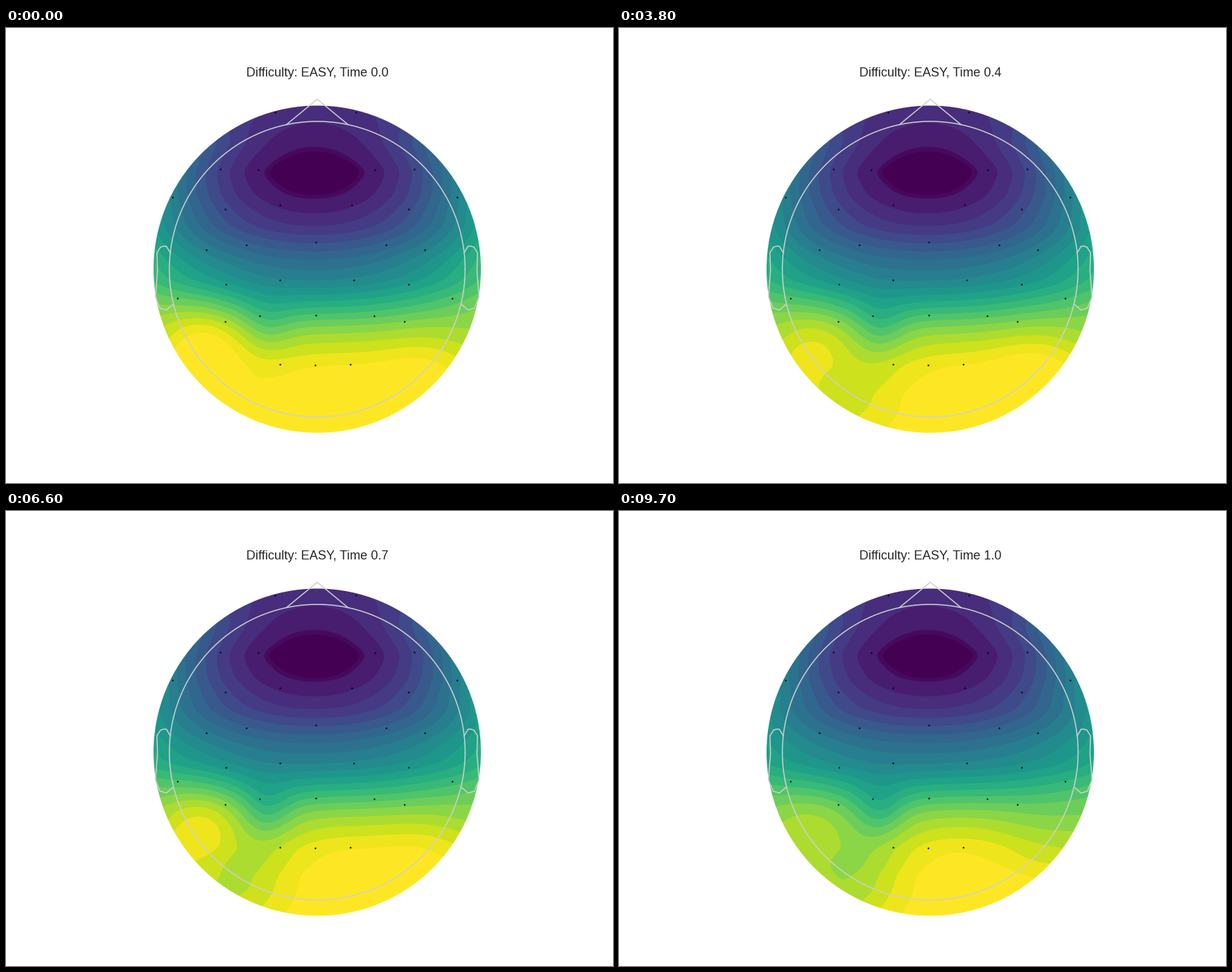
Recreate the animation shown at these times as a matplotlib script. Size 864 by 648 pixels, loop 10 s.

```python
import numpy as np
import matplotlib.pyplot as plt
from matplotlib.animation import FuncAnimation
from matplotlib.patches import Circle

W, H, DPI = 864, 648, 72
FRAMES, STEP = 200, 50
CX, CY, R_MAP, R_HEAD = 443, 343.5, 233, 210.5
X0, Y0, SIZE = 209, 109, 469
BANDS = 20
GREY = "#d0d0d0"

# Electrodes: left x, right x, shared y; then the midline.
PAIRS = [
    (383, 498, 120), (304.5, 581, 201), (358.5, 525, 202), (237, 641.5, 241),
    (311.5, 572.5, 257.5), (390, 492, 252), (342, 541, 308.5), (284.5, 595.5, 316),
    (389.5, 495, 359), (313, 572.5, 365), (244, 634.5, 385), (312, 567, 417.5),
    (360.5, 523.5, 410), (390, 489.5, 479),
]
MIDLINE = [(441, 304.5), (440.5, 408.5), (439.5, 479.5)]

# Activity, in colour bands, down the midline and its rise towards the sides.
PROFILE = [(90, 2.6), (137, 2), (205, -.1), (238, .75), (264, 2), (283, 3), (330, 7),
           (360, 9), (380, 11), (396, 12.8), (427, 16.3), (447, 18), (480, 20.1),
           (520, 21.1), (590, 21.1)]
SIDES = [(90, 5), (137, 7.5), (163, 11.5), (203, 12), (258, 9.7), (305, 7.2),
         (383, 4), (410, 2), (440, -.6), (485, -2), (520, -1), (580, 0)]

# Strength of the local sources over time.
KEY_TIMES = [350, 900, 2550, 4800, 6600, 8400, 9700]
BLOB = [3.8, 4, 3.8, 2.4, 4.2, 1.9, 2.5]
SAG = [1, 2, 3, 2.7, 3.9, 4.5, 4.4]
RIGHT = [1.2, 1.4, 1.6, 1.8, .8, .2, -.9]

xs = X0 + 0.5 + np.arange(SIZE)
ys = Y0 + 0.5 + np.arange(SIZE)


def curve(keys, soft=15):
    """Smoothed line through the keys, as one column of values."""
    rows = np.arange(ys[0] - soft, ys[-1] + soft + 0.5)
    window = np.hanning(2 * soft + 1)
    return np.convolve(np.interp(rows, *zip(*keys)), window / window.sum(), "valid")[:, None]


def bump(x, y, sx, sy):
    gx = np.exp(-((xs - x) / sx) ** 2 / 2)
    gy = np.exp(-((ys - y) / sy) ** 2 / 2)
    return np.outer(gy, gx).astype(np.float32)


lateral = (np.abs(xs - 439) / R_MAP) ** 2.1
base = (curve(PROFILE) + curve(SIDES) * lateral).astype(np.float32)
fade = (np.exp(-((ys - 350) / 80) ** 2)[:, None] * lateral).astype(np.float32)
blob = bump(280, 450, 45, 45)
sag = bump(315, 510, 65, 65)
notch = bump(372, 425, 25, 28)
right = bump(598, 485, 48, 48)


def field(ms):
    def track(keys):
        return np.float32(np.interp(ms, KEY_TIMES, keys))

    depth = track(SAG)
    return (base - np.float32(ms / 5000) * fade + track(BLOB) * blob - depth * sag
            - (1 + depth / 4) * notch + track(RIGHT) * right)


steps = np.r_[0, (np.arange(BANDS) + 0.5) / BANDS, 1]
palette = (plt.get_cmap("viridis")(steps)[:, :3] * 255).astype(np.float32)


def paint(v):
    """Filled bands with softened one-pixel borders."""
    v = np.where(v < 1, 1 - 5 * (1 - v), v)  # the lowest band is narrow
    slope = np.hypot(*np.gradient(v)) + 1e-4
    k = np.clip(np.rint(v), 0, BANDS).astype(int)
    w = np.clip((v - k) / slope + 0.5, 0, 1)[..., None]
    low = palette[k]
    return (low + w * (palette[k + 1] - low) + 0.5).astype(np.uint8)


fig = plt.figure(figsize=(W / DPI, H / DPI), dpi=DPI, facecolor="white")
ax = fig.add_axes([0, 0, 1, 1])
ax.axis("off")

image = ax.imshow(paint(field(0)), extent=(X0, X0 + SIZE, Y0 + SIZE, Y0),
                  interpolation="nearest", aspect="auto", zorder=1)
ax.set(xlim=(0, W), ylim=(H, 0))
image.set_clip_path(Circle((CX, CY), R_MAP, transform=ax.transData))


def outline(x, y):
    """Line in head units, where the head has a diameter of 1."""
    ax.plot(CX + 2 * R_HEAD * np.array(x), CY - 2 * R_HEAD * np.array(y),
            color=GREY, lw=1.5, zorder=3)


turn = np.linspace(0, 2 * np.pi, 200)
outline(np.cos(turn) / 2, np.sin(turn) / 2)
outline([-0.1043, 0, 0.1043], [0.489, 0.575, 0.489])
ear_x = np.array([.497, .51, .518, .5299, .5419, .54, .547, .532, .51, .489])
ear_y = [.0555, .0775, .0783, .0746, .0555, -.0055, -.0932, -.1313, -.1384, -.1199]
outline(ear_x, ear_y)
outline(-ear_x, ear_y)

dots = [(x, y) for l, r, y in PAIRS for x in (l, r)] + MIDLINE
ax.plot(*zip(*dots), "o", color="black", ms=2.3, mew=0, zorder=4)
title = ax.text(CX, 68.7, "", ha="center", va="baseline", color="#262626",
                family="Liberation Sans", size=18)


def update(n):
    ms = n * STEP
    image.set_data(paint(field(ms)))
    title.set_text(f"Difficulty: EASY, Time {ms / 10000:.1f}")
    return image, title


anim = FuncAnimation(fig, update, frames=FRAMES, interval=STEP,
                     repeat=True, repeat_delay=0)
plt.show()
```
